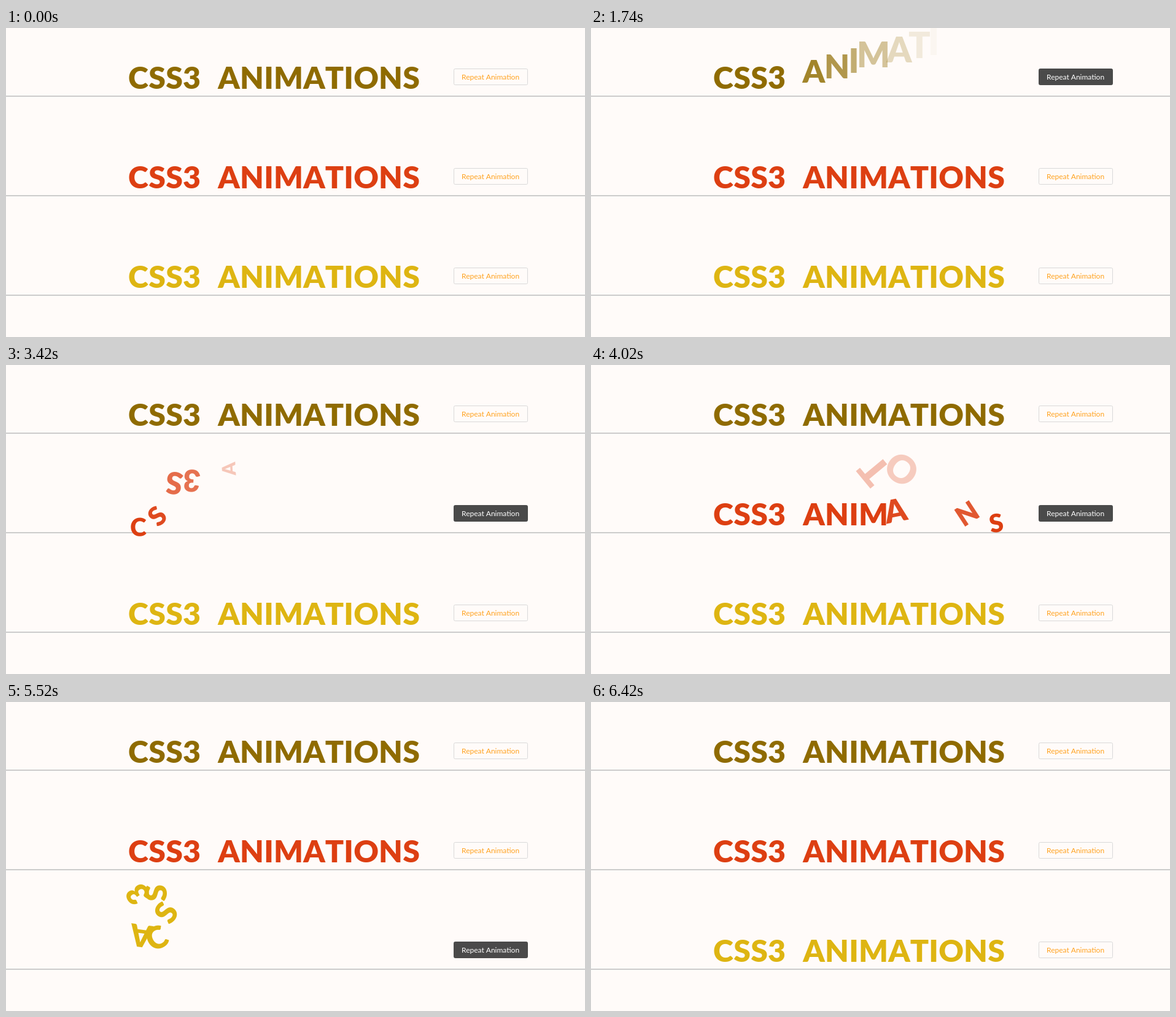
Write an HTML page with a canvas that moves like this. It is 943 px wide and 503 px high and loops after 6960 ms.

```html
<!DOCTYPE html>
<html lang="en">
<head>
<meta charset="utf-8">
<title>CSS3 Animations</title>
<style>
  html, body { margin: 0; width: 100%; height: 100%; overflow: hidden; background: #fffbf9; }
  canvas { display: block; }
</style>
</head>
<body>
<canvas id="stage" width="943" height="503"></canvas>
<script>
const ctx = document.getElementById('stage').getContext('2d');
const LOOP = 6960, STEP = 60, STAGGER = 40, ROW_HEIGHT = 162;
const TITLE = 'CSS3 ANIMATIONS';
const TITLE_FONT = '900 50px Lato, sans-serif';
const BUTTON_FONT = '12px Lato, sans-serif';

const mix = (a, b, u) => a + (b - a) * u;
const clamp = u => Math.min(1, Math.max(0, u));
const smooth = u => (u = clamp(u)) * u * (3 - 2 * u);
const smoother = u => u * u * u * (10 - 15 * u + 6 * u * u);

// Each motion maps elapsed ms to [x, y, degrees, scale, opacity] around the resting letter.
function drop(ms) {
  const p = smooth((ms - 60) / 380);
  return [0, mix(-60, 0, p), 0, mix(1.2, 1, p), p];
}

// Swing down, rest briefly, get flung up to the left, return.
const swing = [
  { at: 0, pose: [0, -77, -80, .55, .2] },
  { at: 145, pose: [0, -54, -180, 1, .75] },
  { at: 230, pose: [0, 21, 0, .81, 1] },
  { at: 290, pose: [0, 14, -10, .82, 1] },
  { at: 400, pose: [-108, -104, -190, 1.4, 0] },
  { at: 500, pose: [0, 0, 0, 1, 1] }
];
function fling(ms) {
  const next = swing.findIndex(key => key.at > ms);
  if (next < 0) return swing[swing.length - 1].pose;
  const from = swing[next - 1], to = swing[next];
  const p = smoother((ms - from.at) / (to.at - from.at));
  return from.pose.map((value, i) => mix(value, to.pose[i], p));
}

// Clockwise arc around a point left of the letter, closing in at the end.
function spiral(ms) {
  const polar = (radius, degrees, fn) => radius * fn(degrees * Math.PI / 180);
  const radius = mix(88, 57, smooth((ms - 200) / 300));
  const angle = mix(180, 370, smooth(ms / 295));
  const [x, y] = [Math.cos, Math.sin].map(fn => polar(radius, angle, fn) - polar(57, 370, fn));
  return [x, y, mix(-180, 0, smooth(ms / 320)), 1, clamp(ms / 30)];
}

const rows = [
  { color: '#8f6b00', motion: drop, start: 1200, hover: [600, 1860] },
  { color: '#dd3f12', motion: fling, start: 3180, hover: [2160, 4200] },
  { color: '#deb512', motion: spiral, start: 5280, hover: [4860, 6240] }
];

// Unkerned letters on whole-pixel advances; the second word has its own left edge.
ctx.font = TITLE_FONT;
let pen = 199;
const letters = [...TITLE].map((char, i) => {
  if (i === 5) pen = 345;
  const width = Math.round(ctx.measureText(char).width);
  pen += width;
  return { char, x: pen - width / 2 };
});

function drawTitle({ color, motion, start }, time) {
  ctx.font = TITLE_FONT;
  ctx.textAlign = 'center';
  ctx.fillStyle = color;
  letters.forEach(({ char, x }, i) => {
    const elapsed = time < start ? LOOP : time - start - i * STAGGER;
    if (elapsed <= 0) return;
    const [dx, dy, degrees, scale, opacity] = motion(elapsed);
    ctx.save();
    ctx.globalAlpha = opacity;
    ctx.translate(x + dx, 81 + dy);
    ctx.rotate(degrees * Math.PI / 180);
    ctx.scale(scale, scale);
    ctx.fillText(char, 0, 18);
    ctx.restore();
  });
}

function drawButton(active) {
  ctx.beginPath();
  ctx.roundRect(729.5, 66.5, 120, 26, 2);
  ctx.fillStyle = '#4a4a4a';
  ctx.strokeStyle = active ? '#4a4a4a' : '#d9d9d9';
  if (active) ctx.fill();
  ctx.stroke();
  ctx.font = BUTTON_FONT;
  ctx.textAlign = 'left';
  ctx.fillStyle = active ? '#fff' : '#ffa21f';
  ctx.fillText('Repeat Animation', 742, 84);
}

function draw() {
  const now = performance.now() % LOOP;
  const time = Math.floor(now / STEP) * STEP;
  ctx.fillStyle = '#fffbf9';
  ctx.fillRect(0, 0, 943, 503);
  rows.forEach((row, i) => {
    const [enter, leave] = row.hover;
    ctx.save();
    ctx.translate(0, i * ROW_HEIGHT);
    ctx.fillStyle = '#ccc';
    ctx.fillRect(0, 110, 943, 2);
    drawTitle(row, time);
    drawButton(time >= enter && time < leave);
    ctx.restore();
  });
  requestAnimationFrame(draw);
}
draw();
</script>
</body>
</html>
```
